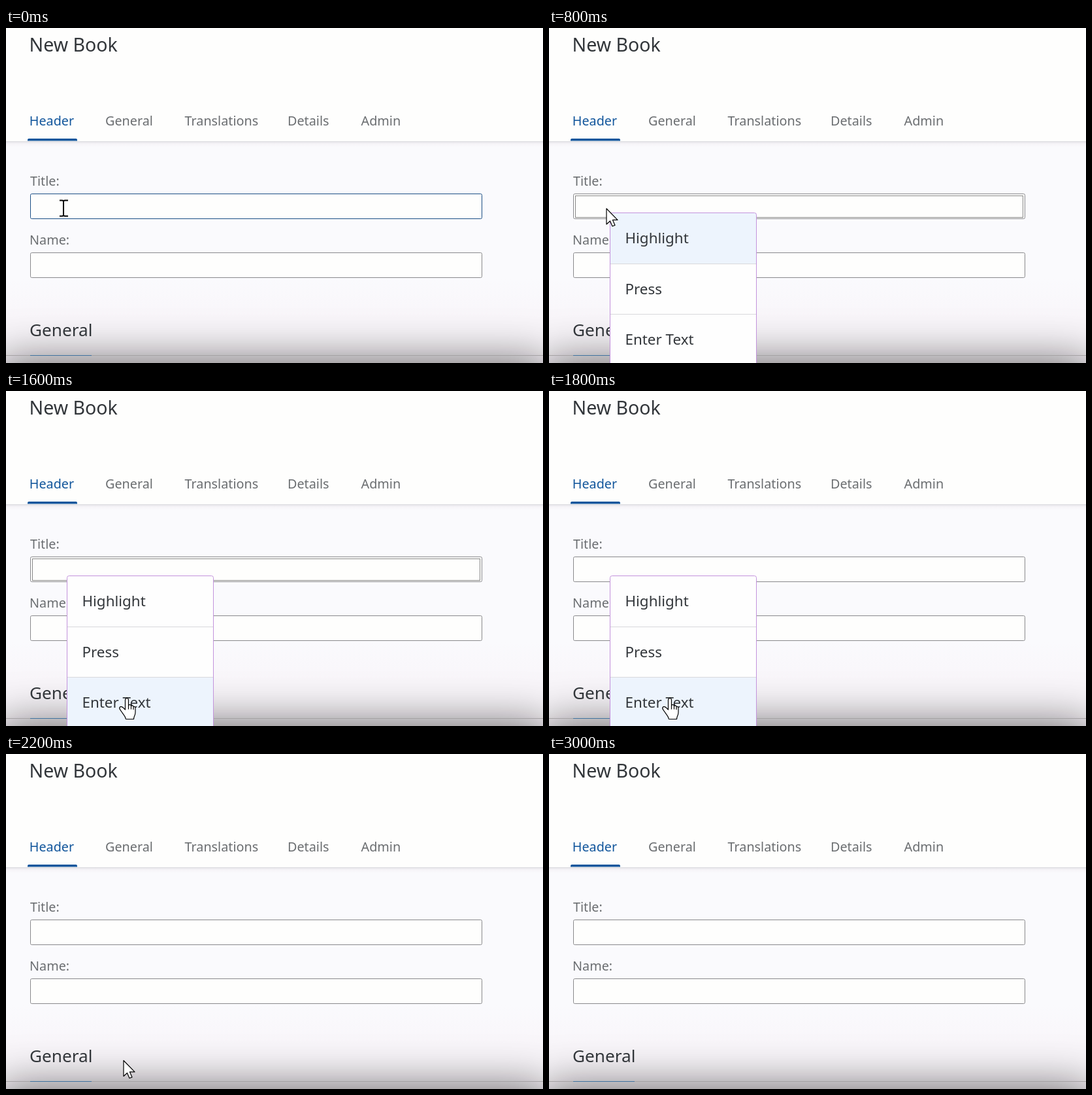
An HTML page that plays this animation: 822 by 512 pixels, repeating every 3.6 s.

```html
<!DOCTYPE html>
<html lang="en">
<head>
<meta charset="utf-8">
<title>New Book form</title>
<style>
  html, body { margin: 0; width: 100%; height: 100%; overflow: hidden; background: #fefefd; }
  #stage { position: relative; width: 822px; height: 512px; overflow: hidden; }
  #page { position: absolute; top: 173px; width: 100%; bottom: 0; overflow: hidden;
    background: linear-gradient(#d6d6da, #e6e5e9 1px, #f6f4f8 4px, #fafafd 9px, #fafafd 210px, #f9f6fa 270px); }
  #shade { position: absolute; top: 339px; left: -10px; right: -10px; height: 200px;
    box-shadow: 0 0 70px rgba(8, 4, 6, .64); }
  svg { position: absolute; inset: 0; font-family: "Noto Sans", "Open Sans", sans-serif; }
  text { font-size: 19.8px; fill: #6a6d70; }
  .big { fill: #32363a; }
  #menu text { font-size: 22.4px; fill: #32363a; }
  .box { fill: #fefefd; stroke: #89898c; }
  .hover { stroke: #1c4f86; }
  .marked { fill: #a5a2ea; stroke: #1c0fae; }
  .cursor { fill: #fff; stroke: #000; stroke-width: 1.2; stroke-linejoin: round; }
</style>
</head>
<body>
<div id="stage">
  <div id="page"><div id="shade"></div></div>
  <svg width="822" height="512" viewBox="0 0 822 512">
    <text class="big" x="35.5" y="36" style="font-size:28.5px">New Book</text>
    <g id="tabs"></g>
    <path d="M33 172.5v-1.5q0-2 2-2h72q2 0 2 2v1.5z" fill="#12569c"/>
    <text x="37" y="241">Title:</text>
    <rect id="title" class="box" x="37.5" y="253.5" width="691" height="38" rx="2"/>
    <rect id="focus" x="40.5" y="256.5" width="685" height="33" fill="none" stroke="#111" stroke-dasharray="1 1"/>
    <path id="caret" d="M51.5 262v22" stroke="#222"/>
    <text x="36" y="331">Name:</text>
    <rect class="box" x="37.5" y="343.5" width="691" height="38" rx="2"/>
    <text class="big" x="36" y="471" style="font-size:26.2px">General</text>
    <path d="M0 500.5h822" stroke="#a5a2a4"/>
    <path d="M37 500.5h94" stroke="#3f729f"/>
    <g id="menu">
      <rect x="93.5" y="282.5" width="224" height="240" rx="3" fill="#fefefe"/>
      <rect id="row" x="94" width="223" height="77" fill="#edf4fd"/>
      <path d="M94 360.5h223M94 437.5h223" stroke="#d9d9dc"/>
      <rect x="93.5" y="282.5" width="224" height="240" rx="3" fill="none" stroke="#c393dc"/>
      <text x="116.5" y="329">Highlight</text>
      <text x="116.5" y="407">Press</text>
      <text x="116.5" y="484">Enter Text</text>
    </g>
    <path id="beam" class="cursor" style="fill:none;stroke-width:2"
      d="M-6 -12h4q2 0 2 2q0-2 2-2h5M0 -10v20M-6 12h4q2 0 2-2q0 2 2 2h5"/>
    <path id="arrow" class="cursor" d="M0 0V24l5.5-5 3.5 8 4-1.6-3.5-8H17z"/>
    <path id="hand" class="cursor"
      d="M0 3c0-4 5-4 5 0v9c0-3 4-2.5 4 0v1c0-3 3.5-2 3.5 0v1.5c0-2.5 3-2 3 0v7c0 5-2.5 6-2.5 10.500H1c-1-5-4-7-6-10.500-3-4-5-6-3-8s5 1 8 4zM5 12v5M9 13v4M12.500 14.500v3"/>
  </svg>
</div>
<script>
const $ = id => document.getElementById(id);
const LOOP = 3600;

const tabs = [["Header", 35.8], ["General", 152], ["Translations", 273.5], ["Details", 431], ["Admin", 543.5]];
$("tabs").innerHTML = tabs.map(([name, x], i) =>
  `<text x="${x}" y="149"${i ? "" : ' style="fill:#12569c"'}>${name}</text>`).join("");

// time, cursor, x, y, title style, focus ring, caret, highlighted menu row (-1 = closed)
const steps = [
  [0, "beam", 88, 275.5, "hover", 0, 0, -1],
  [200, "beam", 88, 275.5, "hover", 1, 1, -1],
  [800, "arrow", 88, 276, "", 1, 0, 0],
  [1200, "hand", 142, 364.5, "", 1, 0, 0],
  [1400, "hand", 189, 463, "", 1, 0, 2],
  [1600, "hand", 182.5, 469.5, "", 1, 0, 2],
  [1800, "hand", 182.5, 469.5, "", 0, 0, 2],
  [2000, "arrow", 183.5, 470.5, "marked", 0, 0, -1],
  [2200, "arrow", 180, 468.5, "", 0, 0, -1],
  [2400, "arrow", 176.5, 466.5, "", 0, 0, -1],
  [3000, "", 0, 0, "", 0, 0, -1]
];

const show = (id, on) => $(id).style.display = on ? "" : "none";

function draw(t) {
  const [, cursor, x, y, style, focus, caret, row] = steps.findLast(s => s[0] <= t);
  for (const id of ["beam", "arrow", "hand"]) {
    show(id, id === cursor);
    $(id).setAttribute("transform", `translate(${x} ${y})`);
  }
  $("title").setAttribute("class", "box " + style);
  $("title").setAttribute("rx", style === "marked" ? 0 : 2);
  show("focus", focus);
  show("caret", caret);
  show("menu", row >= 0);
  $("row").setAttribute("y", 283 + 77.3 * Math.max(row, 0));
}

const start = performance.now();
function tick() {
  draw((performance.now() - start) % LOOP);
  requestAnimationFrame(tick);
}
tick();
</script>
</body>
</html>
```
